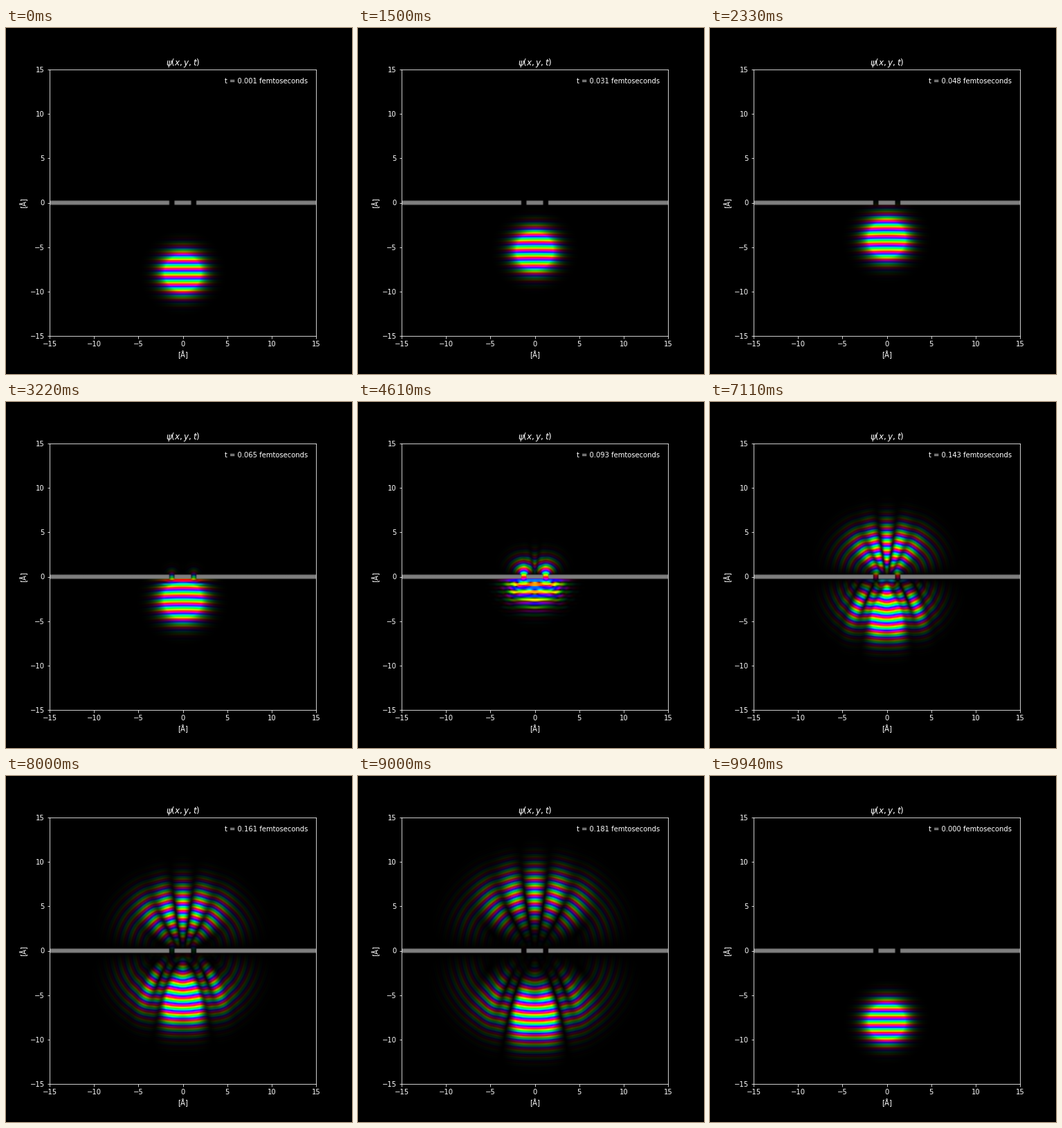
Recreate the animation shown at these times as a matplotlib script. Size 500 by 500 pixels, loop 9990 ms.

```python
import numpy as np
import matplotlib.pyplot as plt
from matplotlib.animation import FuncAnimation

FRAMES = 180
LOOP_MS = 9990
SUBSTEPS = 3
N = 256
HALF = 15.0                  # half width of the box, angstrom
HBAR_M = 11.577              # hbar / electron mass, angstrom^2 / fs
FRAME_DT = 0.1995 / FRAMES   # fs
SPEED = 82.7                 # angstrom / fs
SIGMA = 1.0
START_Y = -8.0
SATURATION = 0.2

x = np.linspace(-HALF, HALF, N)
X, Y = np.meshgrid(x, x)

# Two slits, 0.5 wide, in a thin wall
in_slit = (np.abs(X) > 0.99) & (np.abs(X) < 1.5)
wall = (np.abs(Y) < 0.25) & ~in_slit


def simulate():
    """Split-step evolution of the packet, one state per frame."""
    dt = FRAME_DT / SUBSTEPS
    k = 2 * np.pi * np.fft.fftfreq(N, x[1] - x[0])
    k2 = k[None, :] ** 2 + k[:, None] ** 2
    kinetic = np.exp(-0.5j * HBAR_M * k2 * dt)
    barrier = np.where(wall, np.exp(-2j), 1)

    r2 = X ** 2 + (Y - START_Y) ** 2
    psi = np.exp(-r2 / (4 * SIGMA ** 2) + 1j * SPEED / HBAR_M * Y)
    states = [psi.astype(np.complex64)]
    for _ in range(FRAMES - 1):
        for _ in range(SUBSTEPS):
            psi = np.fft.ifft2(np.fft.fft2(psi * barrier) * kinetic)
        states.append(psi.astype(np.complex64))
    return states


def to_rgba(psi):
    """Phase as hue, magnitude as opacity."""
    hue = 3 * np.angle(psi) / np.pi + 3
    rgba = np.empty((N, N, 4), np.float32)
    rgba[..., 0] = np.abs(hue - 3) - 1
    rgba[..., 1] = 2 - np.abs(hue - 2)
    rgba[..., 2] = 2 - np.abs(hue - 4)
    rgba[..., 3] = np.abs(psi) / full
    return np.clip(rgba, 0, 1)


states = simulate()
full = SATURATION * max(np.abs(s).max() for s in states)

plt.style.use("dark_background")
plt.rcParams["font.family"] = "DejaVu Sans"
fig = plt.figure(figsize=(500 / 72, 500 / 72), dpi=72)
ax = fig.add_axes([0.126, 0.11, 0.77, 0.77])

look = dict(origin="lower", interpolation="gaussian",
            extent=[-HALF, HALF, -HALF, HALF])
ax.imshow(wall.astype(float), cmap="gray", vmin=0, vmax=2, **look)
wave = ax.imshow(to_rgba(states[0]), **look)
ax.set_title(r"$\psi(x,y,t)$")
ax.set_xlabel("[Å]")
ax.set_ylabel("[Å]")
ticks = range(-15, 16, 5)
ax.set_xticks(ticks)
ax.set_yticks(ticks)
clock = ax.text(0.97, 0.97, "", color="white", transform=ax.transAxes,
                ha="right", va="top")


def draw(frame):
    step = (frame + 1) % FRAMES   # the last frame is already back at t = 0
    wave.set_data(to_rgba(states[step]))
    clock.set_text(f"t = {step * FRAME_DT:.3f} femtoseconds")
    return wave, clock


anim = FuncAnimation(fig, draw, frames=FRAMES, interval=LOOP_MS / FRAMES,
                     repeat=True, repeat_delay=0)
plt.show()
```
